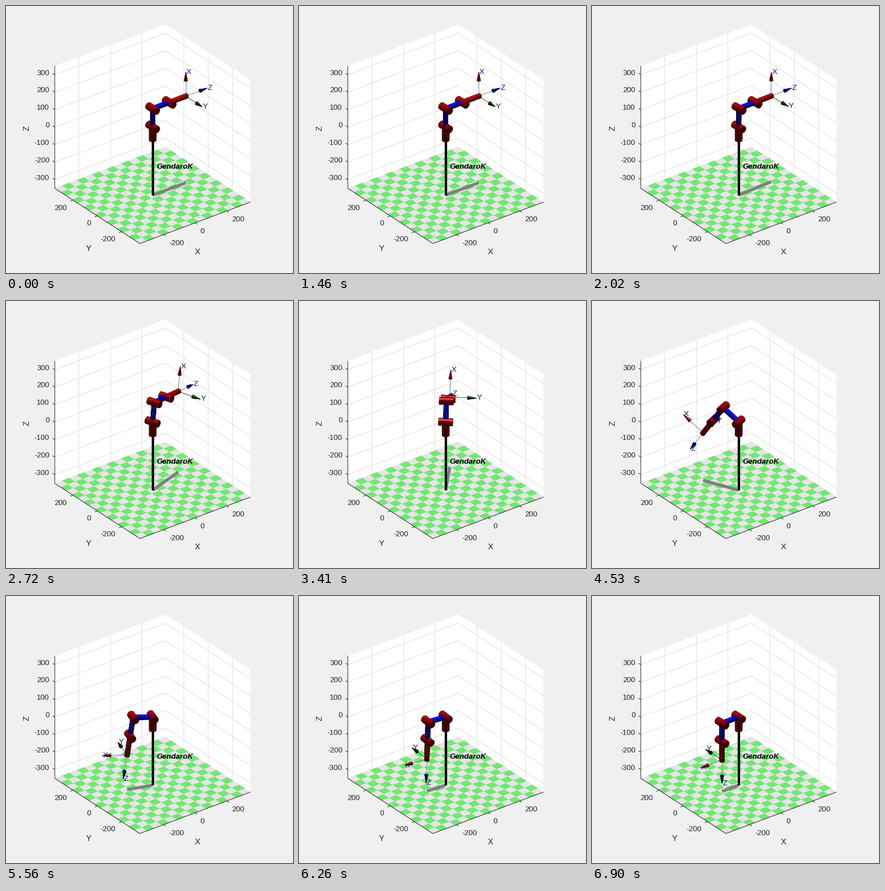
A matplotlib script for the animation above (7.74 s loop, 506x471 px).

```python
import numpy as np
import matplotlib.pyplot as plt
from matplotlib.animation import FuncAnimation
from matplotlib.collections import LineCollection, PolyCollection

W, H = 506, 471
LOOP, DT = 7740, 30
LIM = 350
SANS = "Liberation Sans"

# Orthographic view: screen vectors of one unit along x, y, z
BASIS = np.array([[195, -73.2], [-150, -97.4], [0, -216]]) / 700
CENTER = np.array([258.5, 225.75])
az, el = np.radians([-37.5, 30])
CAM = np.array([np.sin(az) * np.cos(el), -np.cos(az) * np.cos(el), np.sin(el)])
UP = np.array([0, 0, 1.0])

RED, BLUE = (0.7, 0, 0), (0, 0, 0.95)
LINK, JOINT_R, JOINT_H, LINK_R = 105, 18.5, 35.5, 12.5
AXIS_LEN, CONE_LEN, CONE_R = 135, 46, 9

# Moments at which the pose advances, on a 69.6 ms clock
STEPS = 1460 + 69.6 * np.floor(1.626 * np.arange(49) + 0.855)


def proj(p):
    return CENTER + np.asarray(p, float) @ BASIS


def shade(color, n):
    nz = max(n[2], 0)
    spec = 0
    if nz > 0:
        spec = 0.45 * max(0, (2 * nz * n - UP) @ CAM) ** 10
    return np.clip(np.array(color) * (0.3 + 0.6 * nz) + spec, 0, 1)


def tube(a, b, r0, r1, color, parts=1, sides=24):
    """Visible faces of a cylinder or cone as (depth, polygon, colour)."""
    a, b = np.asarray(a, float), np.asarray(b, float)
    w = (b - a) / np.linalg.norm(b - a)
    ref = UP if abs(w[2]) < 0.9 else np.array([1.0, 0, 0])
    u = np.cross(ref, w)
    u /= np.linalg.norm(u)
    v = np.cross(w, u)
    ang = np.linspace(0, 2 * np.pi, sides + 1)
    ring = np.outer(np.cos(ang), u) + np.outer(np.sin(ang), v)
    cuts = np.linspace(0, 1, parts + 1)
    loops = [a + (b - a) * t + ring * (r0 + (r1 - r0) * t) for t in cuts]
    faces = []
    for i in range(sides):
        n = ring[i] + ring[i + 1] + 2 * w * (r0 - r1) / np.linalg.norm(b - a)
        n /= np.linalg.norm(n)
        if n @ CAM <= 0:
            continue
        c = shade(color, n)
        for lo, hi in zip(loops, loops[1:]):
            quad = np.array([lo[i], lo[i + 1], hi[i + 1], hi[i]])
            faces.append((quad.mean(0) @ CAM, proj(quad), c))
    for loop, n, r in ((loops[0], -w, r0), (loops[-1], w, r1)):
        if r > 0 and n @ CAM > 0:
            faces.append((loop[:-1].mean(0) @ CAM, proj(loop), shade(color, n)))
    return faces


def pose(s):
    """Joint positions and tool axes for progress s in 0..1."""
    yaw, tilt = np.pi * s, np.pi / 2 * s
    out = np.array([np.cos(yaw), np.sin(yaw), 0])
    x = np.sin(tilt) * out + np.cos(tilt) * UP
    z = np.cos(tilt) * out - np.sin(tilt) * UP
    y = np.cross(z, x)
    shoulder = 40 * UP
    elbow = shoulder + LINK * x
    wrist = elbow + LINK * z
    return shoulder, elbow, wrist, wrist + LINK * z, (x, y, z)


# The small margin keeps the pixel size from rounding down
fig = plt.figure(figsize=((W + 0.01) / 100, (H + 0.01) / 100), dpi=100,
                 facecolor="#f0f0f0")
ax = fig.add_axes([0, 0, 1, 1])
ax.set_xlim(0, W)
ax.set_ylim(H, 0)
ax.axis("off")


def px(size):
    return size * 0.72


def label(x, y, s, size=13.33, color="#262626", **kw):
    kw = {"ha": "center", "va": "center", **kw}
    return ax.text(x, y, s, fontsize=px(size), family=SANS, color=color, **kw)


def lines(segs, color, width, z):
    ax.add_collection(LineCollection([proj(s) for s in segs], colors=color,
                                     linewidths=px(width), zorder=z))


def scenery():
    L = LIM
    walls = [[(-L, L, -L), (L, L, -L), (L, L, L), (-L, L, L)],
             [(L, L, -L), (L, -L, -L), (L, -L, L), (L, L, L)]]
    ax.add_collection(PolyCollection([proj(w) for w in walls],
                                     facecolors="white", zorder=0))
    grid = [[(-L, L, z), (L, L, z), (L, -L, z)] for z in range(-300, 301, 100)]
    for t in (-200, 0, 200):
        grid += [[(t, L, -L), (t, L, L)], [(L, t, -L), (L, t, L)]]
    lines(grid, "#dfdfdf", 1, 1)

    e = np.linspace(-L, L, 16)
    tiles, cols = [], []
    for i in range(15):
        for j in range(15):
            x0, x1, y0, y1 = e[i], e[i + 1], e[j], e[j + 1]
            tiles.append(proj([(x0, y0, -L), (x1, y0, -L),
                               (x1, y1, -L), (x0, y1, -L)]))
            cols.append("#73e673" if (i + j) % 2 else "#e5e5e5")
    ax.add_collection(PolyCollection(tiles, facecolors=cols, edgecolors=cols,
                                     linewidths=0.2, zorder=2))

    lines([[(-L, L, L), (-L, L, -L), (-L, -L, -L), (L, -L, -L)]],
          "#262626", 1, 3)
    d = 17
    ticks = [[(-L, L, z), (-L, L + d, z)] for z in range(-300, 301, 100)]
    for t in (-200, 0, 200):
        ticks += [[(t, -L, -L), (t, -L - d, -L)], [(-L, t, -L), (-L - d, t, -L)]]
        x, y = proj((t, -L, -L))
        label(x + 8.5 + (0 if t == 0 else 1), y + 15.5, str(t), ha="left")
        x, y = proj((-L, t, -L))
        label(x - 11, y + 14, str(t), ha="right")
    lines(ticks, "#262626", 1, 3)
    for z in range(-300, 301, 100):
        label(76.5, proj((-L, L, z))[1] - 2.5, str(z), ha="right")
    label(338, 434, "X", 14.67)
    label(145, 428, "Y", 14.67)
    label(36, 215, "Z", 14.67, rotation=90)


scenery()
shadow, = ax.plot([], [], color="#808080", lw=px(5.5), zorder=4,
                  solid_capstyle="butt")
ax.plot(*proj([(0, 0, -LIM), (0, 0, 0)]).T, color="black", lw=px(4.2),
        zorder=5, solid_capstyle="butt")
label(265, 283.5, "GendaroK", color="black", ha="left", weight="bold",
      style="italic", zorder=6)

AXES = [("X", (0.6, 0, 0), "#5a7896", "#14146e"),
        ("Y", (0, 0.22, 0), "#3c5a3c", "#1a1a46"),
        ("Z", (0, 0, 0.65), "#7d9669", "#14146e")]
shafts = [ax.plot([], [], color=a[2], lw=px(1), zorder=7)[0] for a in AXES]
names = [label(0, 0, a[0], color=a[3], ha="left", zorder=9) for a in AXES]
arm = PolyCollection([], linewidths=0.3, zorder=8)
ax.add_collection(arm)


def progress(t):
    u = np.searchsorted(STEPS, t, side="right") / 49
    return u ** 3 * (10 - 15 * u + 6 * u * u)


def draw(n):
    shoulder, elbow, wrist, tip, axes = pose(progress(n * DT + 20))
    hinge, reach = axes[1], axes[2]
    faces = tube(-JOINT_H * UP, JOINT_H * UP, JOINT_R, JOINT_R, RED, 2)
    for p in (shoulder, elbow, wrist):
        faces += tube(p - JOINT_H * hinge, p + JOINT_H * hinge,
                      JOINT_R, JOINT_R, RED, 3)
    faces += tube(shoulder, elbow, LINK_R, LINK_R, BLUE, 6)
    faces += tube(elbow, wrist, LINK_R, LINK_R, BLUE, 6)
    faces += tube(wrist, tip + 8 * reach, LINK_R, LINK_R, RED, 6)

    for d, (_, color, _, _), shaft, name in zip(axes, AXES, shafts, names):
        end = tip + AXIS_LEN * d
        faces += tube(end - CONE_LEN * d, end, CONE_R, 0, color, 1, 16)
        shaft.set_data(*proj([tip, end]).T)
        name.set_position(proj(end) + (1, 0))

    faces.sort(key=lambda f: f[0])
    arm.set_verts([f[1] for f in faces])
    cols = [f[2] for f in faces]
    arm.set_facecolor(cols)
    arm.set_edgecolor(cols)
    shadow.set_data(*proj([(0, 0, -LIM), (tip[0], tip[1], -LIM)]).T)
    return [arm, shadow, *shafts, *names]


anim = FuncAnimation(fig, draw, frames=LOOP // DT, interval=DT,
                     init_func=lambda: draw(0), repeat=True, repeat_delay=0)
plt.show()
```
